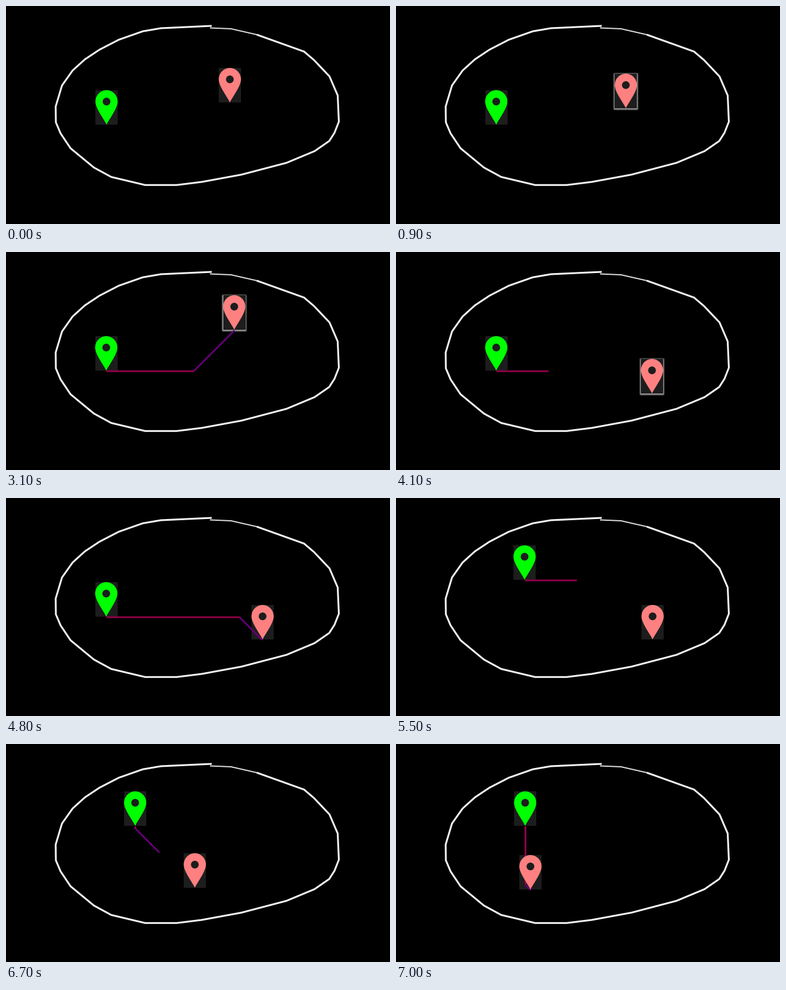
A matplotlib script that plays this animation: 657 by 373 pixels, repeating every 8 s.

```python
import numpy as np
import matplotlib.pyplot as plt
from matplotlib.animation import FuncAnimation
from matplotlib.patches import Circle, FancyBboxPatch, PathPatch, Rectangle
from matplotlib.path import Path

W, H, DPI = 657, 373, 100
STEP_MS, FRAMES = 100, 80
PX = 72 / DPI
PIN_W, PIN_H, HEAD = 38, 59, 19.5
BOX = "#1d1d1d"
GREEN, RED = "#00ff00", "#ff8080"
STRAIGHT, DIAGONAL = "#900048", "#640074"

# corners of the hand-drawn border
BORDER = [(352, 34), (265, 38), (234, 43.3), (193, 57.7), (160, 74.7),
          (135, 91.3), (114, 110.3), (95.8, 136), (85, 172), (85.3, 199),
          (93.4, 218), (110.4, 243.4), (150.4, 276.4), (180, 292.5),
          (238, 306.3), (292, 306.3), (335, 301), (403, 288.5), (480, 268.3),
          (528, 248.3), (553, 231), (562, 217), (569.5, 198), (567.5, 153),
          (553.5, 120.5), (527, 92.5), (510, 78), (429, 49)]
BORDER_TAIL = [(349, 37.5), (385, 39), (429, 49)]

# drags: first step, number of steps, place reached by the pin's box
RED_START, RED_DRAGS = (364, 106), [(9, 3, (390, 131)), (27, 3, (371.5, 74)),
                                    (38, 3, (419, 183)), (45, 1, (420, 183)),
                                    (65, 6, (211, 190))]
GREEN_START, GREEN_DRAGS = (153, 144), [(9, 1, (152.5, 144)), (52, 3, (201, 81)),
                                        (61, 1, (202, 81))]
LIT = range(1, 45)  # steps during which the red pin is selected

# first step and pixels revealed per step; the last one follows the moving pin
GROW, WHOLE = 89, W
ROUTES = [(17, WHOLE), (29, GROW), (41, GROW), (55, GROW), (61, WHOLE), (67, GROW / 2)]


def place(start, drags, i):
    pos = np.array(start, float)
    for first, steps, goal in drags:
        u = np.clip((i - first + 1) / steps, 0, 1) ** 0.85
        pos += (np.array(goal) - pos) * u
    return pos


def red_at(i):
    return place(RED_START, RED_DRAGS, i)


def green_at(i):
    return place(GREEN_START, GREEN_DRAGS, i)


def octile(a, b, length):
    """Straight leg then diagonal leg from a to b, cut to the given length."""
    d = b - a
    size = np.abs(d)
    straight = size.max() - size.min()
    axis = np.where(size == size.max(), np.sign(d), 0)
    elbow = a + axis * min(length, straight)
    end = elbow + np.sign(d) * np.clip(length - straight, 0, size.min())
    return a, elbow, end


def route_at(i):
    started = [r for r in ROUTES if r[0] <= i]
    if not started:
        return None
    first, speed = started[-1]
    when = i if first == ROUTES[-1][0] else first
    tip = np.array([PIN_W / 2 + 0.5, PIN_H + 1])
    return octile(green_at(when) + tip, red_at(when) + tip, speed * (i - first + 1))


def pin_path():
    k, cx = 0.4477, PIN_W / 2
    half = [(cx * k, 0), (0, HEAD * k), (0, HEAD),
            (0, HEAD + 12), (cx - 4, PIN_H - 9), (cx, PIN_H)]
    left = [(cx, 0)] + half
    right = [(PIN_W - x, y) for x, y in left[-2::-1]]
    return Path(left + right, [Path.MOVETO] + [Path.CURVE4] * 12)


class Pin:
    outline = pin_path()

    def __init__(self, ax, color):
        self.halo = [ax.add_patch(FancyBboxPatch(
            (0, 0), PIN_W, PIN_H, boxstyle=f"round,pad={pad}", fc="white", lw=0,
            alpha=0.12 * (4 - pad), zorder=2)) for pad in (3, 2, 1)]
        self.box = ax.add_patch(Rectangle((0, 0), PIN_W, PIN_H, fc=BOX, lw=0, zorder=3))
        self.body = ax.add_patch(PathPatch(self.outline, fc=color, lw=0, zorder=5))
        self.hole = ax.add_patch(Circle((0, 0), 6.6, fc=BOX, lw=0, zorder=6))

    def move(self, pos, lit=False):
        self.box.set_xy(pos)
        self.body.set_path(Path(self.outline.vertices + pos, self.outline.codes))
        self.hole.center = pos + (PIN_W / 2, HEAD)
        for glow in self.halo:
            glow.set_bounds(pos[0], pos[1] + 1, PIN_W, PIN_H)
            glow.set_visible(lit)


fig = plt.figure(figsize=(W / DPI, H / DPI), dpi=DPI, facecolor="black")
ax = fig.add_axes([0, 0, 1, 1])
ax.set_xlim(0, W)
ax.set_ylim(H, 0)
ax.axis("off")


def stroke(points, color, width, z):
    return ax.plot(*zip(*points), color=color, lw=width * PX, snap=False, zorder=z,
                   solid_capstyle="butt", solid_joinstyle="round")[0]


stroke(BORDER, "#f3f3f1", 3.1, 1)
stroke(BORDER_TAIL, "#dededc", 2, 1)
legs = [stroke([(0, 0)], c, 3, 4) for c in (STRAIGHT, DIAGONAL)]
green, red = Pin(ax, GREEN), Pin(ax, RED)


def draw(i):
    green.move(green_at(i))
    red.move(red_at(i), i in LIT)
    route = route_at(i)
    for n, leg in enumerate(legs):
        leg.set_visible(route is not None)
        if route is not None:
            leg.set_data(*zip(route[n], route[n + 1]))
    return legs


anim = FuncAnimation(fig, draw, frames=FRAMES, interval=STEP_MS, init_func=lambda: draw(0),
                     repeat=True, repeat_delay=0, blit=False)
plt.show()
```
